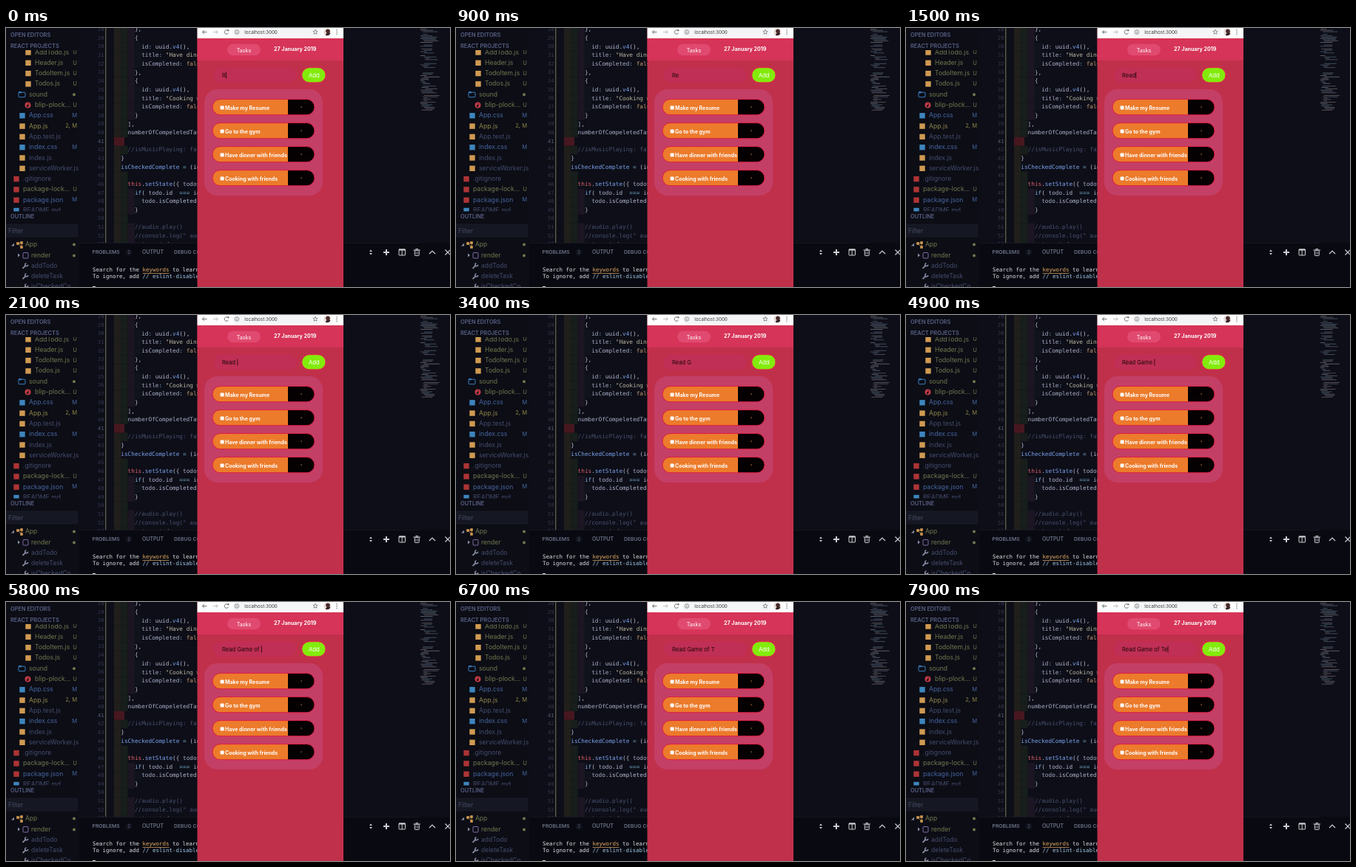
An HTML page with a canvas that plays this animation: 600x351 px, repeating every 8 s.

```html
<!DOCTYPE html>
<html lang="en">
<head>
<meta charset="utf-8">
<title>Todo app</title>
<style>
html, body { margin: 0; width: 100%; height: 100%; overflow: hidden; background: #0c0d15; }
canvas { display: block; width: 600px; height: 351px; }
</style>
</head>
<body>
<canvas id="stage"></canvas>
<script>
const W = 600, H = 351, LOOP = 8000;
const SANS = 'Inter, "Open Sans", sans-serif';
const MONO = '"DejaVu Sans Mono", monospace';
const ratio = window.devicePixelRatio || 1;

const stage = document.getElementById('stage');
const base = document.createElement('canvas');
for (const c of [stage, base]) {
  c.width = W * ratio;
  c.height = H * ratio;
  c.getContext('2d').scale(ratio, ratio);
}
const screen = stage.getContext('2d');
const g = base.getContext('2d');

function box(x, y, w, h, color) {
  g.fillStyle = color;
  g.fillRect(x, y, w, h);
}

function pill(x, y, w, h, r, color, border, weight = 1) {
  g.beginPath();
  g.roundRect(x, y, w, h, r);
  g.fillStyle = color;
  g.fill();
  if (border) {
    g.strokeStyle = border;
    g.lineWidth = weight;
    g.stroke();
  }
}

function dot(x, y, r, color) {
  g.beginPath();
  g.arc(x, y, r, 0, Math.PI * 2);
  g.fillStyle = color;
  g.fill();
}

function ring(x, y, r, color, weight, from = 0, to = Math.PI * 2) {
  g.beginPath();
  g.arc(x, y, r, from, to);
  g.strokeStyle = color;
  g.lineWidth = weight;
  g.stroke();
}

function line(points, color, weight = 1) {
  g.beginPath();
  points.forEach(([x, y]) => g.lineTo(x, y));
  g.strokeStyle = color;
  g.lineWidth = weight;
  g.stroke();
}

function triangle(points, color) {
  g.beginPath();
  points.forEach(([x, y]) => g.lineTo(x, y));
  g.fillStyle = color;
  g.fill();
}

function label(ctx, str, x, y, size, color, { weight = 400, font = SANS, align = 'left' } = {}) {
  ctx.font = `${weight} ${size}px ${font}`;
  ctx.textAlign = align;
  ctx.textBaseline = 'middle';
  ctx.fillStyle = color;
  ctx.fillText(str, x, y);
}

const text = (...args) => label(g, ...args);

function clip(shape, draw) {
  g.save();
  g.beginPath();
  g.roundRect(...shape);
  g.clip();
  draw();
  g.restore();
}

// Code editor: tokens are [color key, string]
const ink = {
  k: '#a9aec9', s: '#bcb8a4', f: '#7ba3ee', p: '#86aee0',
  r: '#d9606c', c: '#4b5273', w: '#b4b9d2', o: '#c79a72', b: '#74a9c6'
};
const CHAR = 4.65, LEFT = 146, PITCH = 11.65;
const rowY = n => 153.8 + (n - 41) * PITCH;

const task = (n, title) => [
  [n, 3, ['w', '{']],
  [n + 1, 4, ['k', 'id'], ['b', ': '], ['w', 'uuid.'], ['f', 'v4'], ['w', '(),']],
  [n + 2, 4, ['k', 'title'], ['b', ': '], ['s', title]],
  [n + 3, 4, ['k', 'isCompleted'], ['b', ': '], ['o', 'false']],
];

const code = [
  [28, 3, ['w', '},']],
  ...task(29, '"Have dinner'),
  [33, 3, ['w', '},']],
  ...task(34, '"Cooking with'),
  [38, 3, ['w', '}']],
  [39, 2, ['w', '],']],
  [40, 2, ['k', 'numberOfCompeletedTasks']],
  [42, 2, ['c', '//isMusicPlaying: false']],
  [43, 1, ['w', '}']],
  [44, 1, ['f', 'isCheckedComplete'], ['b', ' = '], ['w', '(id)']],
  [45, 2],
  [46, 2, ['r', 'this'], ['w', '.'], ['f', 'setState'], ['w', '({ '], ['k', 'todos']],
  [47, 3, ['p', 'if'], ['w', '( '], ['k', 'todo'], ['w', '.id  '], ['b', '=== '], ['k', 'id']],
  [48, 4, ['k', 'todo'], ['w', '.isCompleted']],
  [49, 3, ['w', '}']],
  [50, 2],
  [51, 3, ['c', '//audio.play()']],
  [52, 3, ['c', '//console.log(" audio']],
  [53, 3, ['p', 'return '], ['k', 'todo']],
];

function editor() {
  box(99, 0, 501, 292, '#0d0e17');
  const tints = ['#201f1b', '#171e1b', '#1c1623', '#10131c'];
  for (const [n, depth] of code)
    for (let i = 0; i < depth; i++)
      box(LEFT + i * 2 * CHAR, rowY(n) - PITCH / 2, 2 * CHAR, PITCH, tints[i]);
  box(LEFT, rowY(41) - PITCH / 2, 14, PITCH, '#47171f');
  box(134, 0, 1.4, 292, '#5d5c48');

  for (let n = 28; n <= 53; n++)
    text(String(n), 132.5, rowY(n), 7, n === 41 ? '#565c78' : '#343951', { font: MONO, align: 'right' });

  for (const [n, depth, ...tokens] of code) {
    let col = depth * 2;
    for (const [key, str] of tokens) {
      text(str, LEFT + col * CHAR, rowY(n), 7.72, ink[key], { font: MONO });
      col += str.length;
    }
  }
}

function minimap() {
  let seed = 17;
  const rnd = () => (seed = (seed * 16807) % 2147483647) / 2147483647;
  const tones = ['#4d5166', '#636775', '#465866', '#5d5660'];
  for (let y = 1; y < 112; y += 1.8) {
    const indent = Math.floor(rnd() * 5) * 1.6;
    const len = 4 + rnd() * 18;
    const tone = tones[Math.floor(rnd() * 4)];
    if (rnd() > 0.1) box(560 + indent, y, len, 0.85, tone);
  }
}

// Sidebar
const olive = '#70794f', blue = '#46659f', grey = '#454c6d';
const orange = '#cf9a52', cyan = '#3d85bd', red = '#ad3435';
const files = [
  ['AddTodo.js', 2, orange, olive, 'U'],
  ['Header.js', 2, orange, olive, 'U'],
  ['TodoItem.js', 2, orange, olive, 'U'],
  ['Todos.js', 2, orange, olive, 'U'],
  ['sound', 1, 'folder', olive, 'dot'],
  ['blip-plock...', 2, 'sound', olive, 'U'],
  ['App.css', 1, cyan, blue, 'M'],
  ['App.js', 1, orange, '#8d8549', '2, M'],
  ['App.test.js', 1, orange, grey, ''],
  ['index.css', 1, cyan, blue, 'M'],
  ['index.js', 1, orange, grey, ''],
  ['serviceWorker.js', 1, orange, grey, ''],
  ['.gitignore', 0, red, grey, ''],
  ['package-lock...', 0, red, olive, 'U'],
  ['package.json', 0, red, blue, 'M'],
  ['README.md', 0, cyan, grey, ''],
];

function fileRow([name, depth, icon, color, mark], i) {
  const y = 33 + i * 14.3;
  const x = 23 + depth * 8;
  const ix = x - 9;
  if (icon === 'folder') {
    pill(ix - 5, y - 3, 9, 6.5, 1, '#0c0d15', '#3b7fc0', 1);
    box(ix - 5, y - 4, 4, 2, '#3b7fc0');
  } else if (icon === 'sound') {
    dot(ix - 0.5, y, 4, '#c23b45');
    box(ix - 0.3, y - 2.5, 0.8, 4, '#0c0d15');
    dot(ix - 1, y + 1.3, 1.2, '#0c0d15');
  } else {
    box(ix - 3.7, y - 3.7, 7.4, 7.4, icon);
  }
  text(name, x, y, 8.6, color);
  if (mark === 'dot') dot(92, y, 2, olive);
  else text(mark, 96, y, 7.6, color, { align: 'right' });
}

function wrench(x, y) {
  line([[x - 3.5, y + 3.5], [x + 1, y - 1]], '#868ba1', 2);
  ring(x + 1.7, y - 1.7, 2, '#868ba1', 1.5, 0, 4.6);
}

function sidebar() {
  const title = { weight: 600 };
  box(0, 0, 99, 351, '#0c0d15');
  clip([0, 30, 99, 219, 0], () => files.forEach(fileRow));
  text('OPEN EDITORS', 6, 9.8, 7.4, '#596187', title);
  text('REACT PROJECTS', 6, 24.7, 7.4, '#596187', title);

  box(0, 248.5, 99, 103, '#0c0d15');
  text('OUTLINE', 6, 255.5, 7.4, '#596187', title);
  pill(-2, 266, 99, 17, 1, '#151722', '#1b1d2b', 0.7);
  text('Filter', 3, 275, 8.5, '#464c66');

  triangle([[7, 295.5], [11, 295.5], [11, 291.5]], '#8a8fa5');
  for (const [x, y] of [[16, 292], [21, 291], [21, 297]]) box(x - 1.8, y - 1.8, 3.6, 3.6, '#cf9a52');
  line([[16, 292], [21, 291], [21, 297], [16, 292]], '#cf9a52', 0.7);
  text('App', 26, 293.8, 8.5, olive);
  dot(92, 293.5, 2, olive);

  triangle([[16, 305.5], [19, 308], [16, 310.5]], '#8a8fa5');
  pill(23, 304.5, 7, 7.5, 1, '#0c0d15', '#7e6ba6', 1);
  text('render', 34, 308.4, 8.5, olive);
  dot(92, 308.4, 2, olive);
  ['addTodo', 'deleteTask', 'isCheckedCo...'].forEach((name, i) => {
    const y = 322.4 + i * 14.2;
    wrench(26, y);
    text(name, 34, y, 8.5, grey);
  });
}

// Terminal panel
function terminal() {
  box(99, 291.5, 501, 60, '#090a11');
  box(99, 291, 460, 0.8, '#161823');
  const tab = { weight: 500 };
  text('PROBLEMS', 116.6, 304.2, 6.8, '#7b8099', tab);
  dot(166, 304, 4.5, '#11131d');
  text('2', 166, 304.2, 6, '#5a5f78', { align: 'center' });
  text('OUTPUT', 184, 304.2, 6.9, '#7b8099', tab);
  text('DEBUG CONSOLE', 227, 304.2, 6.8, '#7b8099', tab);

  const mono = { font: MONO };
  const plain = '#dcdde2', gold = '#e3a962';
  text('Search for the ', 117, 328.4, 7.47, plain, mono);
  text('keywords', 184.5, 328.4, 7.47, gold, mono);
  box(184.5, 332, 36, 0.7, gold);
  text('to learn', 225, 328.4, 7.47, plain, mono);
  text('To ignore, add ', 117, 337.4, 7.47, plain, mono);
  text('// eslint-disable', 184.5, 337.4, 7.47, '#9fc4e4', mono);
  box(117, 350, 4, 1, plain);

  const c = '#cdcfd6';
  for (const s of [-1, 1])
    triangle([[491, 304 + s], [495, 304 + s], [493, 304 + s * 3.5]], c);
  line([[510, 304], [518, 304]], c, 2);
  line([[514, 300], [514, 308]], c, 2);
  pill(531, 300, 8.5, 8, 0.5, '#090a11', c, 1);
  box(531, 299.5, 8.5, 2, c);
  box(534.7, 300, 1, 8, c);
  pill(552.3, 301.5, 6, 7, 0.8, '#090a11', c, 1);
  line([[550.5, 301], [560, 301]], c, 1);
  line([[553.5, 299.5], [557, 299.5]], c, 1);
  for (const x of [554.2, 556.4]) line([[x, 303], [x, 307]], c, 0.7);
  line([[572, 306], [576, 302], [580, 306]], c, 1.2);
  line([[593.5, 300.5], [600.5, 307.5]], c, 1.2);
  line([[600.5, 300.5], [593.5, 307.5]], c, 1.2);
}

// Browser window with the todo page
const WIN = 258.5, WIN_W = 197.5;

function toolbar() {
  box(WIN, 0, WIN_W, 14, '#fdfdfd');
  pill(306, -1, 120, 13, 6, '#f4f5f6');
  const c = '#63666a', pale = '#b5b7ba';
  line([[271.5, 5.5], [265.5, 5.5]], c, 0.9);
  line([[268, 2.8], [265.3, 5.5], [268, 8.2]], c, 0.9);
  line([[280, 5.5], [286, 5.5]], pale, 0.9);
  line([[283.5, 2.8], [286.2, 5.5], [283.5, 8.2]], pale, 0.9);
  ring(298, 5.5, 2.8, c, 0.9, 0.4, 5.6);
  box(299.4, 2.2, 2, 2, c);
  ring(312, 5.5, 2.8, c, 0.7);
  box(311.6, 5, 0.8, 2.2, c);
  box(311.6, 3.6, 0.8, 0.8, c);
  text('localhost:3000', 322.3, 5.9, 6.3, '#38393c');

  const star = [];
  for (let i = 0; i <= 10; i++) {
    const a = i * Math.PI / 5 - Math.PI / 2, r = i % 2 ? 1.5 : 3.3;
    star.push([418 + r * Math.cos(a), 5.5 + r * Math.sin(a)]);
  }
  line(star, c, 0.7);

  clip([429.2, 0.7, 9.6, 9.6, 4.8], () => {
    box(429, 0, 10, 11, '#e6dcd8');
    dot(435, 4.2, 2.8, '#4a2a2a');
    dot(436, 10.5, 4.3, '#3b2528');
  });
  for (const y of [2.7, 5.5, 8.3]) dot(447, y, 0.75, c);
}

function todoRow(name, i) {
  const y = 96.6 + i * 32;
  const shape = [279, y, 138, 21.2, 10.6];
  pill(...shape, '#050103');
  clip(shape, () => box(279, y, 102, 22, '#ec7b2b'));
  pill(...shape, 'transparent', '#e41f47', 1);
  pill(289.6, y + 9, 5, 5, 0.8, '#fff');
  text(name, 296, y + 12.2, 7.02, '#fff', { weight: 700 });
  line([[398.4, y + 9.9], [399.8, y + 11.3]], '#b8743e', 0.7);
  line([[399.8, y + 9.9], [398.4, y + 11.3]], '#b8743e', 0.7);
}

function page() {
  box(WIN, 0, WIN_W, 351, '#c0304b');
  box(WIN, 14, WIN_W, 30, '#d63458');
  toolbar();
  pill(299, 21.7, 45, 15.5, 7.7, '#e14a70');
  text('Tasks', 321.5, 30.4, 7.2, '#fff', { align: 'center' });
  text('27 January 2019', 362, 28.7, 7.1, '#fff', { weight: 700 });

  pill(280.5, 53.5, 112.5, 21, 10.5, '#c02f55', '#cb2b50', 0.8);
  pill(399.7, 53.7, 32.3, 20.2, 10.1, '#83ec0b', '#e8234a', 1);
  text('Add', 416.3, 64.3, 7.7, '#fff', { align: 'center' });

  pill(268, 83, 160, 144, 18, '#c43f66');
  ['Make my Resume', 'Go to the gym', 'Have dinner with friends', 'Cooking with friends'].forEach(todoRow);
}

function paintBase() {
  editor();
  minimap();
  terminal();
  sidebar();
  page();
}

// Typed entry: one key press per time, caret restarts its blink at each
const entry = 'Read Game of Te';
const keys = [-200, 300, 1000, 1400, 1800, 2700, 3600, 4000, 4400, 4800, 5200, 5500, 5800, 6100, 7500];

function draw(t) {
  screen.drawImage(base, 0, 0, W, H);
  const count = keys.filter(k => k <= t).length;
  const typed = entry.slice(0, count);
  label(screen, typed, 292, 64.4, 7.55, '#1c070d');
  if ((t - keys[count - 1]) % 1000 < 500) {
    screen.fillRect(292.3 + screen.measureText(typed).width, 59.5, 0.8, 9, '#1c070d');
  }
}

paintBase();
const start = performance.now();
function tick() {
  draw((performance.now() - start) % LOOP);
  requestAnimationFrame(tick);
}
tick();
</script>
</body>
</html>
```
